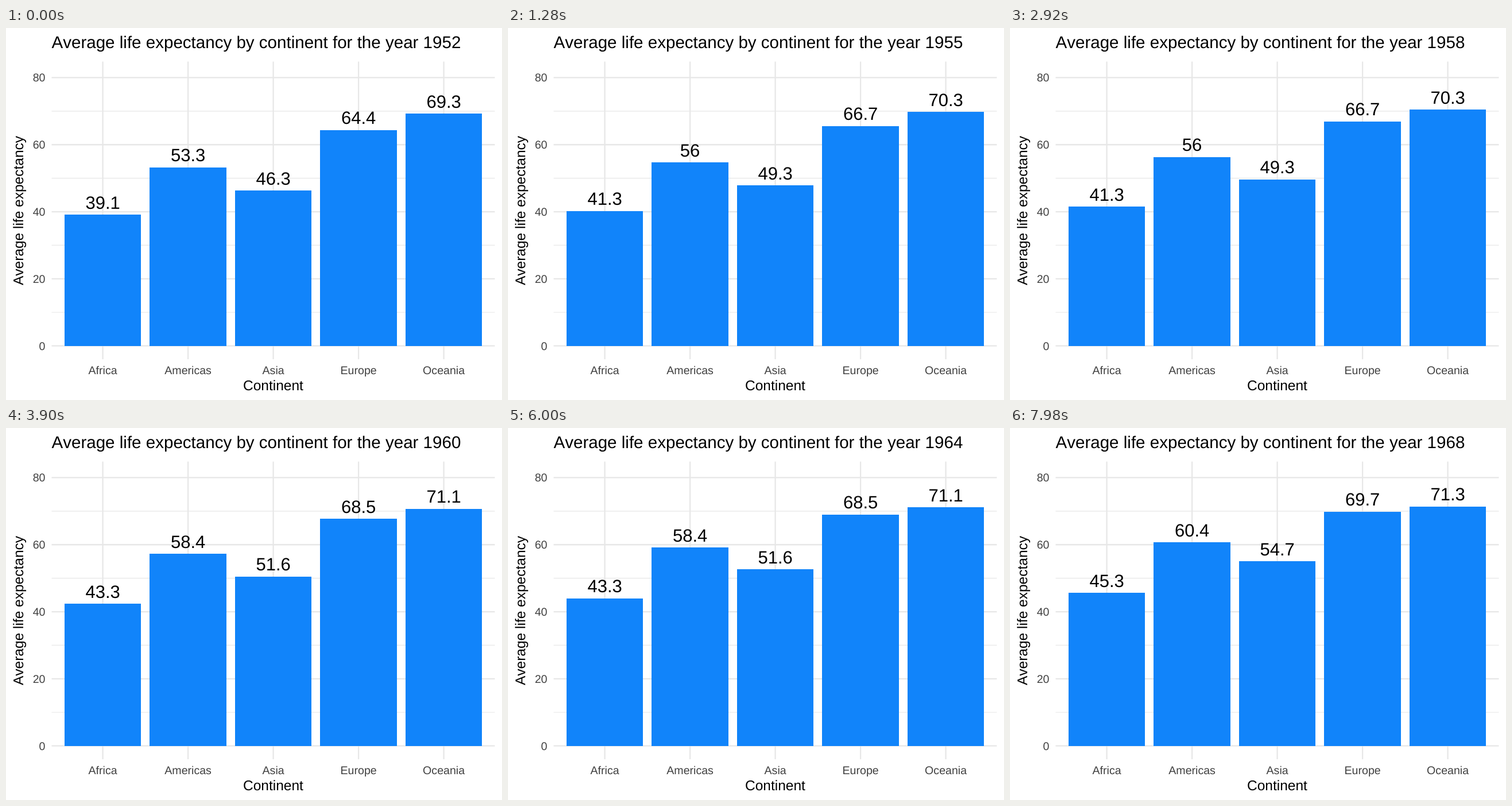
Animation of 864 by 648 pixels, one loop 8000 ms. Source, as an HTML page:

```html
<!DOCTYPE html>
<html lang="en">
<head>
<meta charset="utf-8">
<title>Average life expectancy</title>
<style>
  html, body { margin: 0; width: 100%; height: 100%; overflow: hidden; background: #fff; }
  svg { display: block; width: 864px; height: 648px; }
  text {
    font-family: "Liberation Sans", Arial, sans-serif;
    font-kerning: none;
    text-rendering: geometricPrecision;
  }
</style>
</head>
<body>
<svg id="chart" viewBox="0 0 864 648"></svg>
<script>
const LOOP = 8000;
const FIRST_YEAR = 1952, YEAR_STEP = 5, YEARS_PER_FRAME = 55 / 599;
const PANEL = { left: 79.5, right: 851.5, top: 58.4, bottom: 577 };
const GRID = '#e7e7e7', BLUE = '#1184fa', GREY = '#404040';

// Mean life expectancy every five years, starting in 1952
const data = {
  Africa:   [39.1355, 41.2663, 43.3194, 45.3345, 47.4509],
  Americas: [53.2798, 55.9603, 58.3988, 60.4109, 62.3949],
  Asia:     [46.3144, 49.3185, 51.5632, 54.6636, 57.3193],
  Europe:   [64.4085, 66.7031, 68.5392, 69.7376, 70.7750],
  Oceania:  [69.2550, 70.2950, 71.0850, 71.3100, 71.9100],
};

const chart = document.getElementById('chart');
const yOf = value => 553.66 - 5.84 * value;
const xOf = index => 168.6 + 148.5 * index;

function add(tag, attributes, content = '') {
  const node = document.createElementNS(chart.namespaceURI, tag);
  for (const name in attributes) node.setAttribute(name, attributes[name]);
  node.textContent = content;
  return chart.appendChild(node);
}

function addLine(x1, y1, x2, y2, width) {
  add('line', { x1, y1, x2, y2, stroke: GRID, 'stroke-width': width });
}

function addText(content, x, y, size, anchor = 'middle', fill = '#000', extra = {}) {
  return add('text', { x, y, 'font-size': size, 'text-anchor': anchor, fill, ...extra }, content);
}

for (let value = 0; value <= 80; value += 10) {
  const major = value % 20 === 0;
  addLine(PANEL.left, yOf(value), PANEL.right, yOf(value), major ? 2.3 : 1.2);
  if (major) addText(value, 68.5, yOf(value) + 7, 19.6, 'end', GREY);
}

const names = Object.keys(data);
names.forEach((name, i) => {
  addLine(xOf(i), PANEL.top, xOf(i), PANEL.bottom, 2.3);
  addText(name, xOf(i), 602.5, 19.6, 'middle', GREY);
});

const title = addText('', PANEL.left, 35, 29.55, 'start');
addText('Continent', 465.5, 630.5, 24.5);
addText('Average life expectancy', 0, 0, 24.5, 'middle', '#000',
  { transform: 'translate(30 318) rotate(-90)' });

const bars = names.map((name, i) => {
  const left = Math.round(xOf(i) - 66.8), right = Math.round(xOf(i) + 66.8);
  return add('rect', { x: left, width: right - left, fill: BLUE, 'shape-rendering': 'crispEdges' });
});
const labels = names.map((name, i) => addText('', xOf(i), 0, 31));

// Three frames per 140 ms: two of 20 ms, then one held for 100 ms
function frameAt(time) {
  const shifted = time + 20;
  const cycle = Math.floor(shifted / 140);
  return 3 * cycle - 1 + Math.min(2, Math.floor((shifted - 140 * cycle) / 20));
}

function draw(time) {
  const elapsed = frameAt(time) * YEARS_PER_FRAME;
  const position = elapsed / YEAR_STEP;
  const from = Math.floor(position), part = position - from;

  title.textContent =
    `Average life expectancy by continent for the year ${Math.round(FIRST_YEAR + elapsed)}`;

  names.forEach((name, i) => {
    const series = data[name];
    const y = yOf(series[from] + (series[from + 1] - series[from]) * part);
    const top = Math.round(y);
    bars[i].setAttribute('y', top);
    bars[i].setAttribute('height', 554 - top);
    labels[i].setAttribute('y', y - 10.5);
    labels[i].textContent = Math.round(series[Math.round(position)] * 10) / 10;
  });
}

let start;
function tick(now) {
  start ??= now;
  draw(Math.max(0, now - start) % LOOP);
  requestAnimationFrame(tick);
}
draw(0);
requestAnimationFrame(tick);
</script>
</body>
</html>
```
